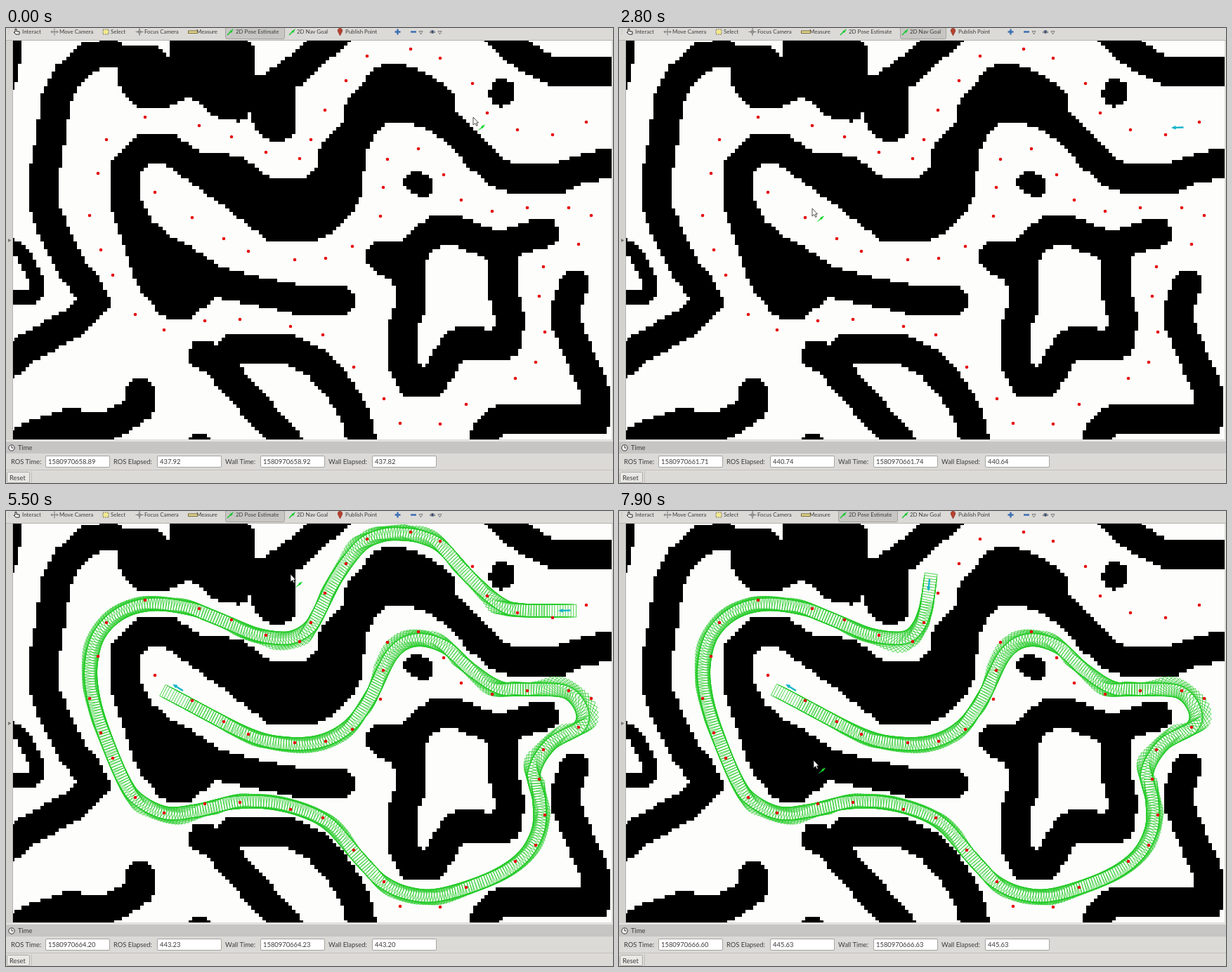
These frames come from a looping animation (864 by 648 pixels, 8 s). An HTML page:

```html
<!DOCTYPE html>
<html lang="en">
<head>
<meta charset="utf-8">
<title>Path planner view</title>
<style>
html, body { margin: 0; width: 100%; height: 100%; overflow: hidden; background: #dcdad7; }
svg { display: block; width: 100vw; height: 100vh; font: 9.4px Lato, "Open Sans", sans-serif; fill: #3c3c3c; }
.tools text { font-size: 7.9px; }
.bold { font-weight: 700; }
</style>
</head>
<body>
<svg id="stage" viewBox="0 0 864 648">
  <defs><clipPath id="view"><rect x="10" y="18" width="852" height="568"/></clipPath></defs>
  <rect width="864" height="648" fill="#dcdad7"/>
  <rect y="18" width="9" height="569" fill="#d3d2cf"/>
  <path d="M9.5 18V586M0 17.5H864" stroke="#b5b4b1" fill="none"/>
  <path d="M3 300L7.5 302.5 3 305Z" fill="#777"/>
  <rect x="10" y="18" width="852" height="568" fill="#fdfdfb"/>
  <g clip-path="url(#view)">
    <path id="map" fill="#000" shape-rendering="crispEdges"/>
    <g id="plans" fill="none" stroke="#27cb2b" stroke-width=".85"></g>
    <g id="dots" fill="#e6080c"></g>
    <g id="arrows"></g>
  </g>

  <g id="tools" class="tools"></g>
  <g fill="none" stroke="#555">
    <path d="M4 2V10" stroke="#aaa" stroke-dasharray="1 2"/>
    <path d="M13 6V1.5H15V5H19V9H14L11 6Z" fill="#fff" stroke="#222"/>
    <path d="M64 5.5H74M69 .5V10.5M66 3.5L64 5.5 66 7.5M72 3.5L74 5.5 72 7.5" stroke="#777"/>
    <rect x="138" y="2" width="8" height="7" fill="#f2e88c" stroke="#777" stroke-dasharray="2 1"/>
    <path d="M190 0V11M184.5 5.5H195.5M190 2.5L193 5.5 190 8.5 187 5.5Z" stroke="#777"/>
    <rect x="259.5" y="4" width="13" height="3.5" fill="#e5d78b" stroke="#75683a"/>
    <path d="M315 10L321 4M403 10L409 4" stroke="#19c830" stroke-width="1.5"/>
    <path d="M318 5L324 1 321 7ZM406 5L412 1 409 7Z" fill="#19c830" stroke="none"/>
    <path d="M475.5 11L472.5 5A3.3 3.3 0 1 1 478.5 5Z" fill="#b7402e" stroke="#80291d" stroke-width=".6"/>
    <path d="M553.5 5.5H561.5M557.5 1.5V9.5M576 5.5H584" stroke="#3c6fb4" stroke-width="2.4"/>
    <path d="M588 4.5H593L590.5 9ZM615 4.5H620L617.5 9Z" stroke="#666" stroke-width=".8"/>
    <path d="M603 6Q607 1 611 6Q607 9 603 6Z" fill="#eee" stroke="#666"/>
    <circle cx="607" cy="5.5" r="1.8" fill="#344c78" stroke="none"/>
  </g>

  <rect y="587" width="864" height="2" fill="#e4e3e0"/>
  <rect y="589" width="864" height="17" fill="#c6c5c3"/>
  <circle cx="8" cy="598" r="4.2" fill="#f4f4f4" stroke="#333"/>
  <path d="M8 595V598H10.5" stroke="#333" fill="none"/>
  <text x="17" y="601.3">Time</text>
  <g id="fields"></g>
  <path d="M0 629.5H864M36.5 631V648" stroke="#c2c1be"/>
  <rect x="1.5" y="632.5" width="32" height="15" rx="2" fill="#e9e8e5" stroke="#aaa9a6"/>
  <text x="5" y="643.5">Reset</text>
  <text id="help" x="38" y="643.5"><tspan class="bold">Left-Click:</tspan> Rotate. <tspan class="bold">Middle-Click:</tspan> Move X/Y. <tspan class="bold">Right-Click:</tspan>: Zoom. <tspan class="bold">Shift</tspan>: More options.</text>

  <g id="cursor">
    <path d="M0 0V11L2.7 8.6 4.7 12.5 6.3 11.7 4.5 8H7.5Z" fill="#fff" stroke="#222" stroke-width=".8"/>
    <path id="poseMark" d="M7.5 18.5L12 14 12 12.8 16.5 11 13.5 15.5 12.5 15.3Z" fill="#16d52c" stroke="#16d52c" stroke-width=".6"/>
    <g id="orbitMark" fill="none">
      <circle cx="12" cy="14" r="3.2" stroke="#333" stroke-width="3"/>
      <circle cx="12" cy="14" r="3.2" stroke="#fff" stroke-width="1.5"/>
      <path d="M9 9.5H12.5V12.5" stroke="#ddd"/>
    </g>
  </g>
</svg>
<script>
const $ = id => document.getElementById(id);
const add = (parent, tag, attrs, text = "") => {
  const node = document.createElementNS("http://www.w3.org/2000/svg", tag);
  for (const key in attrs) node.setAttribute(key, attrs[key]);
  node.textContent = text;
  return parent.appendChild(node);
};
const show = (node, on) => node.setAttribute("visibility", on ? "visible" : "hidden");
const pairs = text => text.split(" ").map(p => p.split(",").map(Number));

// Walls are strokes of a round brush on a coarse occupancy grid
const grid = { cols: 165, rows: 112, cell: 5.27, left: 1.3, top: 3.7 };
const canvas = document.createElement("canvas");
canvas.width = grid.cols;
canvas.height = grid.rows;
const brush = canvas.getContext("2d");
brush.scale(1 / grid.cell, 1 / grid.cell);
brush.translate(-grid.left, -grid.top);
brush.lineCap = brush.lineJoin = "round";
const wall = (d, width = 42) => {
  brush.lineWidth = width;
  brush.stroke(new Path2D("M" + d));
};

// Left side
wall("5 8 1 40-6 75");
wall("150 35 118 40 85 70 70 105 65 150 54 210 54 250 66 285 96 345 118 372 127 390 95 420 20 462-10 490");
wall("0 306 20 317 33 337 42 355 42 382 0 382", 21);
// Upper blob and its arm
wall("181 46 181 75 195 95 222 95 256 77 282 84 312 110 327 112 333 85 333 35 255 20 255 55 310 70 230 70 208 46Z");
wall("355 88 372 118 372 132 382 140 391 140 391 92 370 88 410 62 470 8");
// Long winding wall
wall("170 250 170 200 195 172 232 172 262 193 285 201 305 199 330 204 352 225 375 234 415 237 440 229 465 205 467 175 502 140 502 118 540 73 565 73 595 86 619 105 619 122");
wall("262 193 310 228 355 262 380 282 440 282 462 265 480 245 486 230 490 190 497 155 530 116 580 116 610 126 641 146 669 179 700 207 725 215 785 215 815 202 870 190");
wall("345 235 400 260 450 250 470 215");
wall("170 250 190 287 218 310 265 338 300 362 345 372 420 388 475 388");
wall("170 250 196 330 210 365 235 393 255 393 290 364 240 360 215 325");
// Right frame and pillars
wall("575 325 534 327 560 340 577 365 577 395 566 420 566 480 578 504 608 504 636 455 645 448 712 450 718 415 708 380 708 330 700 312 645 290 610 290 590 305 577 325 577 365");
wall("705 312 740 298 766 292");
wall("706 91V95", 35);
wall("581 219L593 225", 30);
wall("700 5 722 28 750 47 778 62 870 62");
wall("809 365 798 395 798 420 822 480 838 515 838 560 735 554 705 558 683 576 680 590");
// Bottom edge
wall("280 466 295 470 318 497 400 590");
wall("322 458 403 458 440 475 470 507 495 545 507 590");
wall("190 520 190 540 165 557 140 568 85 564 40 580 0 598");
wall("274 600H276");

function wallCells() {
  const { cols, rows, cell, left, top } = grid;
  const pixels = brush.getImageData(0, 0, cols, rows).data;
  const edge = (origin, i) => Math.round(origin + i * cell);
  let d = "";
  for (let row = 0; row < rows; row++) {
    let start = -1;
    for (let col = 0; col <= cols; col++) {
      const filled = col < cols && pixels[(row * cols + col) * 4 + 3] > 127;
      if (filled && start < 0) start = col;
      if (!filled && start >= 0) {
        d += `M${edge(left, start)} ${edge(top, row)}H${edge(left, col)}V${edge(top, row + 1)}H${edge(left, start)}Z`;
        start = -1;
      }
    }
  }
  return d;
}
$("map").setAttribute("d", wallCells());

const addDots = text => pairs(text).forEach(([cx, cy]) => add($("dots"), "circle", { cx, cy, r: 2.3 }));
addDots("826,134 778,152 728,145 685,121 664,79 618,43 576,30 514,40 484,75 454,117 434,159 418,186 370,177 321,155 275,139 198,127 143,159 131,207 119,267 135,316 152,352 184,408 225,430 283,417 333,415 405,425 451,437 495,483");
addDots("538,528 561,563 618,564 655,536 725,499 754,476 767,433 759,382 765,340 815,308 833,267 801,256 742,256 692,261 648,245 623,209 587,172 543,187 537,227 533,268 493,311 455,328 411,330 345,318 310,300 265,270 212,234");

// Rear-axle tracks; the vehicle outline is stamped at even distances
const firstLeg = pairs("803,142 735,141 704,132 663,97 622,53 594,38 565,33 535,35 505,50 472,93 446,143 432,165");
const secondLeg = pairs("443,98 440,120 435,143 426,164");
const outbound = pairs("412,178 390,181 355,175 310,157 265,140 210,133 165,145 133,176 121,220 125,268 142,323 168,384 190,412 228,430 270,427 320,416 370,415 420,426 460,447 500,491 535,527 575,545");
const inbound = pairs("620,546 690,523 735,493 757,455 759,415 752,372 775,333 815,308 819,283 797,258 750,254 705,252 665,228 625,194 583,184 550,204 520,262 490,304 450,327 400,331 345,318 249,269");

function vehicleTrail(points) {
  const spacing = 3.8, front = 32, rear = -9, half = 9;
  const spline = (a, b, c, e, u) => .5 * (2 * b + (c - a) * u + (2 * a - 5 * b + 4 * c - e) * u * u + (3 * b - a - 3 * c + e) * u ** 3);
  const at = i => points[Math.max(0, Math.min(points.length - 1, i))];
  let d = "", last = points[0], travelled = spacing;
  for (let i = 0; i < points.length - 1; i++) {
    for (let step = 1; step <= 90; step++) {
      const [x, y] = [0, 1].map(k => spline(at(i - 1)[k], at(i)[k], at(i + 1)[k], at(i + 2)[k], step / 90));
      const dx = x - last[0], dy = y - last[1], length = Math.hypot(dx, dy);
      travelled += length;
      last = [x, y];
      if (travelled < spacing) continue;
      travelled -= spacing;
      const c = dx / length, s = dy / length;
      const corner = (along, side) => `${(x + along * c - side * s).toFixed(1)} ${(y + along * s + side * c).toFixed(1)}`;
      d += `M${corner(rear, -half)}L${corner(front, -half)} ${corner(front, half)} ${corner(rear, half)}Z`;
    }
  }
  return d;
}
const plans = [firstLeg, secondLeg].map(leg => add($("plans"), "path", { d: vehicleTrail([...leg, ...outbound, ...inbound]) }));

const arrow = color => add($("arrows"), "path", { d: "M0-1.2H11V-2.8L17.5 0 11 2.8V1.2H0Z", fill: color });
const place = (node, [x, y, angle]) => node.setAttribute("transform", `translate(${x} ${y}) rotate(${angle})`);
const startArrow = arrow("#17b5c8"), goalArrow = arrow("#17b5c8"), dragArrow = arrow("#16d52c");
const firstPose = [803.5, 141.5, 178], secondPose = [442, 97, 96], goalPose = [252, 256, 212];
place(goalArrow, goalPose);

const tools = [
  ["Interact", 23, 3, 59], ["Move Camera", 76, 61, 128], ["Select", 149, 133, 175],
  ["Focus Camera", 197, 181, 250], ["Measure", 271, 255, 305], ["2D Pose Estimate", 327, 312, 397],
  ["2D Nav Goal", 414, 400, 466], ["Publish Point", 483, 470, 533]
].map(([name, x, left, right]) => {
  const box = add($("tools"), "rect", { x: left + .5, y: -3, width: right - left - 1, height: 18.5, rx: 2 });
  add($("tools"), "text", { x, y: 8.3 }, name);
  return { name, left, right, box };
});

const fields = [["ROS Time:", 7, 56], ["ROS Elapsed:", 153, 215], ["Wall Time:", 312, 362], ["Wall Elapsed:", 459, 521]]
  .map(([label, x, left]) => {
    add($("fields"), "text", { x, y: 621 }, label);
    add($("fields"), "rect", { x: left + .5, y: 609.5, width: 91, height: 16, rx: 1.5, fill: "#fff", stroke: "#a5a4a1" });
    return add($("fields"), "text", { x: left + 4, y: 621 });
  });

// Rows of [time, ...values]
const track = (keys, t, ease = u => u) => {
  let i = 0;
  while (i < keys.length - 2 && t >= keys[i + 1][0]) i++;
  const a = keys[i], b = keys[i + 1];
  const u = ease(Math.max(0, Math.min(1, (t - a[0]) / (b[0] - a[0]))));
  return a.slice(1).map((v, k) => v + (b[k + 1] - v) * u);
};
const smooth = u => u * u * (3 - 2 * u);
const clocks = [
  [0, 58.89, 437.82], [2000, 60.91, 439.87], [2800, 61.71, 440.64], [4300, 63.27, 442.31],
  [5500, 64.2, 443.2], [6700, 65.38, 444.35], [7900, 66.6, 445.63]
];
const pointer = [
  [0, 665, 127], [700, 803, 141], [900, 803, 141], [1300, 770, 142], [2000, 403, 13], [2200, 412, 8],
  [2800, 275, 257], [2950, 252, 256], [3100, 252, 256], [3400, 232, 243], [4300, 420, 30], [4650, 356, 6],
  [4900, 354, 6], [5500, 405, 90], [5750, 442, 97], [5900, 442, 97], [6200, 440, 120], [6700, 425, 140],
  [7200, 355, 6], [7350, 354, 6], [7900, 277, 355]
];
const modes = [
  [0, "2D Pose Estimate"], [1300, "Interact"], [2200, "2D Nav Goal"], [3400, "Interact"],
  [4800, "2D Pose Estimate"], [6200, "Interact"], [7350, "2D Pose Estimate"]
];
const drags = [[900, 1300, firstPose], [3100, 3400, goalPose], [5900, 6200, secondPose]];

function draw(t) {
  const [x, y] = track(pointer, t, smooth);
  const mode = modes.filter(m => m[0] <= t).pop()[1];
  const overMap = y > 17, interacting = mode === "Interact";
  $("cursor").setAttribute("transform", `translate(${x.toFixed(1)} ${y.toFixed(1)})`);
  show($("poseMark"), overMap && !interacting);
  show($("orbitMark"), overMap && interacting);
  show($("help"), interacting);

  for (const tool of tools) {
    const active = tool.name === mode, hover = !overMap && x >= tool.left && x <= tool.right;
    show(tool.box, active || hover);
    tool.box.setAttribute("fill", active ? "#c7c6c3" : "#f0efec");
    tool.box.setAttribute("stroke", active ? "#a4a3a0" : "#c8c7c4");
  }

  const drag = drags.find(([from, to]) => t >= from && t < to);
  show(dragArrow, drag);
  if (drag) place(dragArrow, drag[2]);
  show(startArrow, t >= 1300);
  place(startArrow, t < 6200 ? firstPose : secondPose);
  show(goalArrow, t >= 3400);
  show(plans[0], t >= 3500 && t < 6400);
  show(plans[1], t >= 6400);

  const [ros, wallElapsed] = track(clocks, t);
  const stamp = seconds => "15809706" + seconds.toFixed(2);
  [stamp(ros), (ros + 379.03).toFixed(2), stamp(ros + .03), wallElapsed.toFixed(2)]
    .forEach((value, i) => fields[i].textContent = value);
}

function tick() {
  draw(Math.floor(performance.now() % 8000 / 100) * 100);
  requestAnimationFrame(tick);
}
tick();
</script>
</body>
</html>
```
